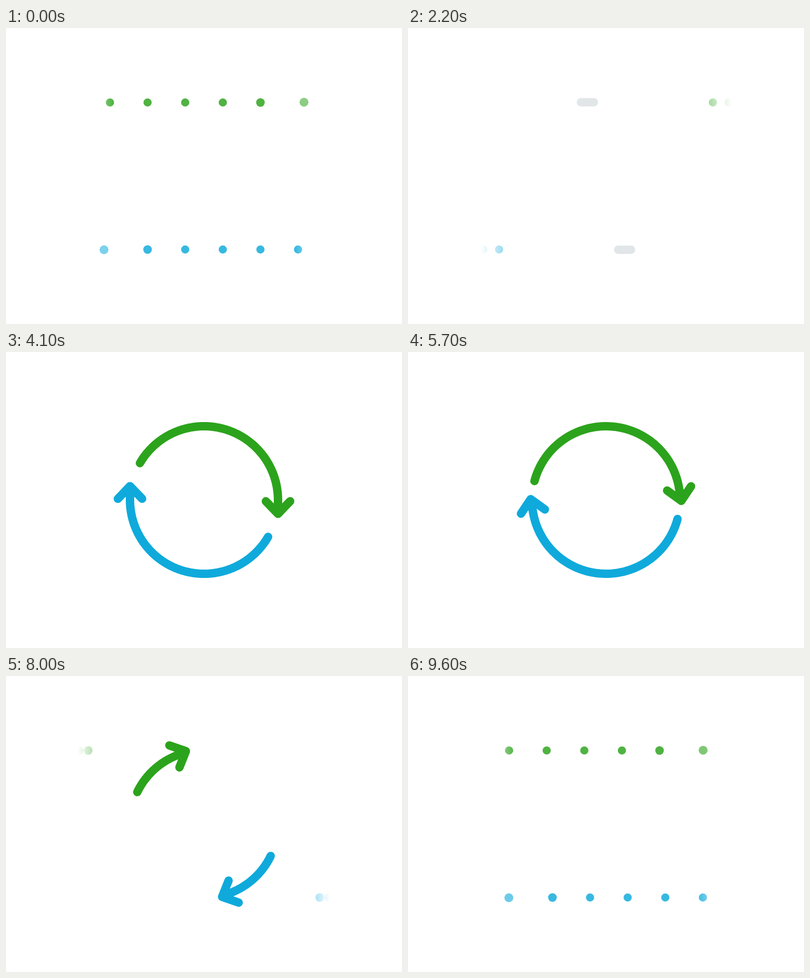
Recreate the animation shown at these times as an HTML page with a canvas. Size 800 by 600 pixels, loop 9700 ms.

```html
<!DOCTYPE html>
<html lang="en">
<head>
<meta charset="utf-8">
<title>Sync arrows</title>
<style>
  html, body { margin: 0; width: 100%; height: 100%; overflow: hidden; background: #fff; }
  canvas { display: block; }
</style>
</head>
<body>
<canvas id="stage" width="800" height="600"></canvas>
<script>
const ctx = document.getElementById('stage').getContext('2d');
const LOOP = 9700, STEP = 100, RADIUS = 149.5, RAD = Math.PI / 180;
const GREEN = [44, 163, 28], BLUE = [15, 170, 219], GRAY = [225, 230, 233];
const DRIFT = 0.058; // px per ms while the dots cross the middle

const clamp = v => Math.max(0, Math.min(1, v));
const mix = (a, b, k) => a + (b - a) * k;
const ease = (t, from, to) => {
  const u = clamp((t - from) / (to - from));
  return u * u * (3 - 2 * u);
};
const rgba = (c, alpha = 1) => `rgba(${c.map(Math.round)},${alpha})`;

// A point on the circle (degrees, -90 is the top), unrolled onto the top tangent by `flat`.
function pointAt(deg, flat) {
  const k = deg < -90 ? flat.before : flat.after;
  return [
    mix(400 + RADIUS * Math.cos(deg * RAD), 400 + (deg + 90) * RAD * RADIUS, k),
    mix(300 + RADIUS * Math.sin(deg * RAD), 300 - RADIUS, k)
  ];
}

function drawArrow({ tail, head, wing, flat, color, width = 17, alpha = 1 }) {
  const [bx, by] = pointAt(head, flat), [px, py] = pointAt(head - 0.1, flat);
  const dir = Math.atan2(by - py, bx - px), cos = Math.cos(dir), sin = Math.sin(dir);
  const local = (along, side) => [bx + along * cos - side * sin, by + along * sin + side * cos];
  const tip = local(28 * wing + 0.01, 0);

  ctx.globalAlpha = alpha;
  ctx.strokeStyle = rgba(color);
  ctx.lineWidth = width;
  ctx.lineCap = ctx.lineJoin = 'round';
  ctx.beginPath();
  ctx.moveTo(...pointAt(tail, flat));
  for (let i = 1; i <= 80; i++) ctx.lineTo(...pointAt(mix(tail, head, i / 80), flat));
  ctx.lineTo(...tip);
  if (wing > 0) {
    ctx.moveTo(...local(2.5 * wing, 24.5 * wing));
    ctx.lineTo(...tip);
    ctx.lineTo(...local(2.5 * wing, -24.5 * wing));
  }
  ctx.stroke();
  ctx.globalAlpha = 1;
}

// Pill bends into an arrow, swings, then pulls back.
function cycleArrow(t, color) {
  const swing = Math.sin((t - 4100) / 2240 * 2 * Math.PI);
  const back = ease(t, 6950, 8000);
  const tail = mix(-109.4, -150 + 15.5 * swing, ease(t, 2250, 4000));
  const head = mix(-99.4, 12.8 * swing + 2.5 * ease(t, 4100, 5200), ease(t, 2250, 3900));
  const tint = ease(t, 2250, 2900);
  drawArrow({
    tail: mix(tail, -154.3, back),
    head: mix(head, -114.5, back),
    wing: t < 4100 ? ease(head, -95, -40) : 1,
    flat: { before: 1 - ease(t, 2250, 3000), after: 0 },
    color: GRAY.map((g, i) => mix(g, color[i], tint)),
    alpha: clamp((t - 2000) / 150)
  });
}

// Arrow shoots along the tangent and shrinks to the leading dot.
function launchArrow(t, color) {
  const along = mix(-64, 202 + DRIFT * (t - LOOP), ease(t, 8000, 9300));
  const head = -90 + along / RADIUS / RAD;
  drawArrow({
    head, color,
    tail: head - 39.8 * (1 - ease(t, 8100, 9050)),
    wing: 1 - ease(t, 8500, 9000),
    flat: { before: 0, after: 1 },
    width: 17 + 7 * ease(t, 9000, 9300) - 6 * ease(t, 9250, 9600),
    alpha: clamp((251 - along) / 90)
  });
}

function drawDots(t, color) {
  const fade = ctx.createLinearGradient(146, 0, 653, 0);
  [[0, 0], [0.138, 0.83], [0.82, 0.83], [1, 0]].forEach(([at, a]) => fade.addColorStop(at, rgba(color, a)));
  ctx.fillStyle = fade;
  for (let i = 0; i < 5; i++) {
    const cruise = 514 - 76 * i + DRIFT * t;
    const x = t < 0
      ? mix(143.7 - 12.7 * i, cruise, ease(t, -2000, -300))
      : mix(cruise, 662.5 + 24.5 * (4 - i), ease(t, 600, 2700));
    ctx.beginPath();
    ctx.arc(x, 151, i ? 8.3 : 8.7, 0, 2 * Math.PI);
    ctx.fill();
  }
}

function drawHalf(t, color) {
  if (t > 7600 || t < 2700) drawDots(t > 5000 ? t - LOOP : t, color);
  if (t >= 8000 || t < 1000) launchArrow(t < 1000 ? t + LOOP : t, color);
  else if (t > 2000) cycleArrow(t, color);
}

function render(now) {
  const t = Math.floor(now / STEP) * STEP % LOOP;
  ctx.clearRect(0, 0, 800, 600);
  drawHalf(t, GREEN);
  ctx.save();
  ctx.translate(800, 600);
  ctx.rotate(Math.PI);
  drawHalf(t, BLUE);
  ctx.restore();
}

const start = performance.now();
function tick() {
  render(performance.now() - start);
  requestAnimationFrame(tick);
}
tick();
</script>
</body>
</html>
```
